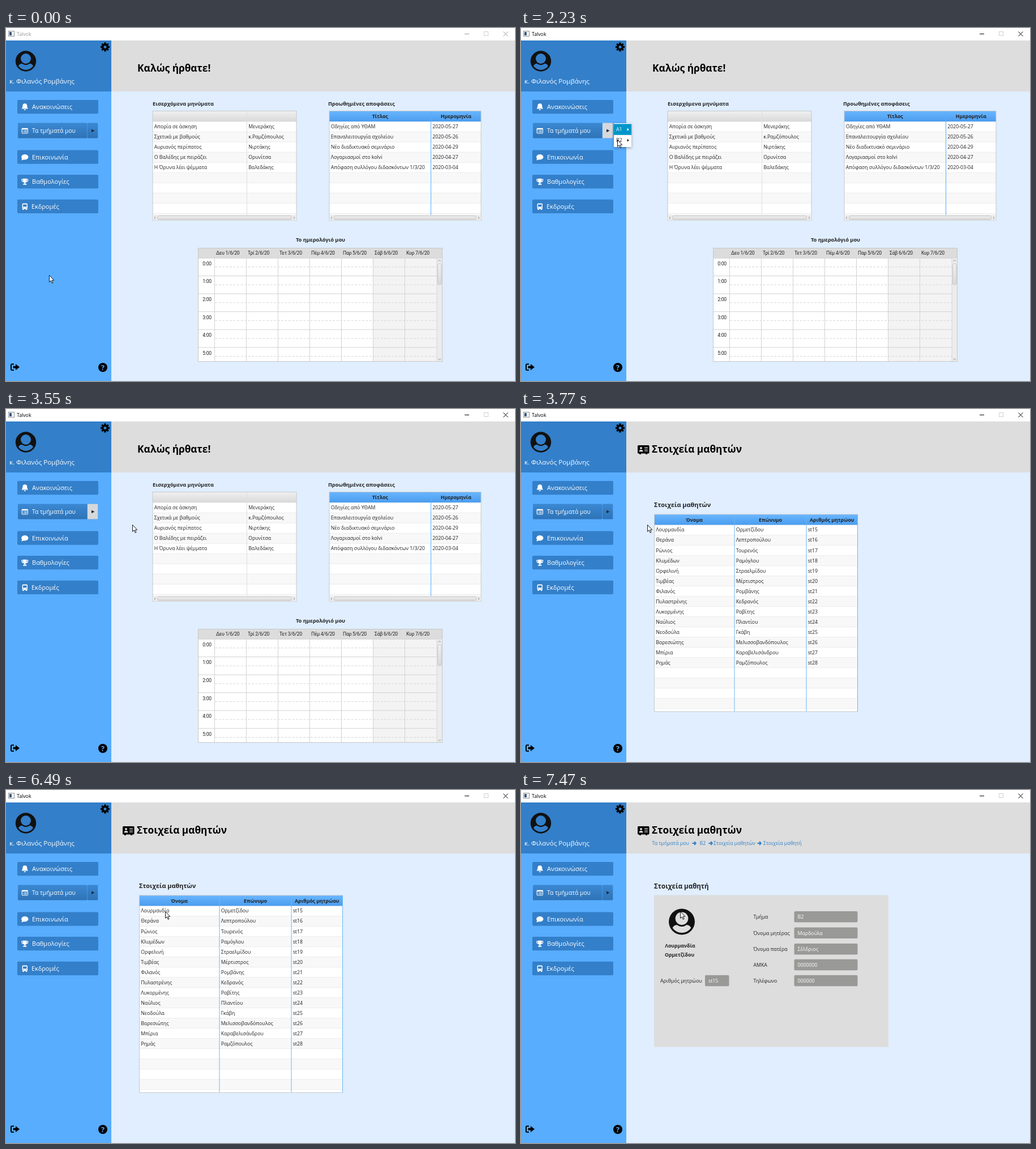
Recreate the animation shown at these times as an HTML page. Size 899 by 623 pixels, loop 8 s.

```html
<!DOCTYPE html>
<html lang="el">
<head>
<meta charset="utf-8">
<title>Talvok</title>
<style>
  html, body { margin: 0; width: 100%; height: 100%; overflow: hidden; background: #e0eeff; }
  svg { display: block; }
  text { font: 8.75px "Open Sans", "Noto Sans", sans-serif; fill: #222; white-space: pre; }
  .b { font-weight: 700; }
  .m { text-anchor: middle; }
  .w { fill: #fff; }
  .btn { font-size: 11px; fill: #fff; }
  .name { font-size: 11.6px; fill: #fff; }
  .title { font-size: 17.3px; fill: #000; }
  .sub { font-size: 9.2px; }
  .h2 { font-size: 10.9px; }
  .h3 { font-size: 11.5px; }
  .crumb { fill: #2f80c8; }
  .cal { font: 8.6px Roboto, "Liberation Sans", sans-serif; letter-spacing: -.25px; }
  .end { text-anchor: end; }
</style>
</head>
<body>
<svg id="stage" width="899" height="623" viewBox="0 0 899 623">
  <defs>
    <linearGradient id="grey" x2="0" y2="1"><stop stop-color="#f0f0f0"/><stop offset="1" stop-color="#d9d9d9"/></linearGradient>
    <linearGradient id="blue" x2="0" y2="1"><stop stop-color="#69b6ff"/><stop offset="1" stop-color="#4b9dee"/></linearGradient>
    <linearGradient id="split" x2="0" y2="1"><stop stop-color="#3b88d2"/><stop offset="1" stop-color="#2e73b7"/></linearGradient>
    <filter id="shadow" x="-20%" y="-20%" width="150%" height="150%">
      <feDropShadow dx="0" dy="1.5" stdDeviation="2.5" flood-opacity=".35"/>
    </filter>
  </defs>
</svg>
<script>
const LOOP = 8000, ACCENT = '#0096c9', SIDE = '#58adff', PANEL = '#ddd', DARK = '#111';

const rect = (x, y, w, h, fill, more = '') =>
  `<rect x="${x}" y="${y}" width="${w}" height="${h}" fill="${fill}" ${more}/>`;
const line = (x1, y1, x2, y2, color, more = '') =>
  `<path d="M${x1} ${y1}L${x2} ${y2}" stroke="${color}" ${more}/>`;
const path = (d, fill, more = '') => `<path d="${d}" fill="${fill}" ${more}/>`;
const disc = (x, y, r, fill) => `<circle cx="${x}" cy="${y}" r="${r}" fill="${fill}"/>`;
const at = (x, y, body, scale = 1) => `<g transform="translate(${x} ${y}) scale(${scale})">${body}</g>`;
const text = (x, y, s, cls = '') => `<text x="${x}" y="${y}" class="${cls}">${s}</text>`;
const group = (id, body) => `<g id="${id}">${body}</g>`;
const range = (n, f) => Array.from({ length: n }, (_, i) => f(i)).join('');

const avatar = (x, y, scale, bg) => at(x, y,
  disc(0, 0, 18.2, DARK) + disc(0, -4.5, 9, bg) +
  path('M-13 8.5C-11.5 5.5-9 4.5-6.8 4.3C-3 7.6 3 7.6 6.8 4.3C9 4.5 11.5 5.5 13 8.5A15.6 15.6 0 0 1-13 8.5Z', bg), scale);

function titleBar(id, ink) {
  return group(id,
    text(19, 13.5, 'Talvok', 'bar').replace('>', ` style="fill:${ink}">`) +
    line(810, 10.5, 818, 10.5, ink) +
    path('M878.5 6.5l8 8m0-8l-8 8', 'none', `stroke="${ink}"`));
}

const icons = {
  bell: path('M0-6C-3-6-4-4-4-1.500C-4 1-5 2-5.800 3.300H5.800C5 2 4 1 4-1.500C4-4 3-6 0-6ZM-1.800 4.200A1.800 1.800 0 0 0 1.800 4.200Z', '#fff'),
  list: rect(-5, -4, 10.5, 8.6, 'none', 'rx="1" stroke="#fff"') + rect(-5, -4.5, 10.5, 2.4, '#fff') +
    path('M-3.500 0h1.300M-1 0h5M-3.500 2.300h1.300M-1 2.300h5', 'none', 'stroke="#fff"'),
  chat: '<ellipse rx="6.200" ry="4.700" fill="#fff"/>' + path('M-5 1.500Q-4.800 4-6.500 5.600Q-3 5.600-1.500 4Z', '#fff'),
  cup: path('M-3.400-5.500H3.400V-2C3.400 0 2 1.500.8 2V3.600H3V5.500H-3V3.600H-.8V2C-2 1.500-3.400 0-3.400-2Z', '#fff') +
    path('M-3.400-4H-5.400C-5.500-1.500-4.500 0-2.500.300M3.400-4H5.400C5.500-1.500 4.500 0 2.500.300', 'none', 'stroke="#fff" stroke-width="1.200"'),
  bus: rect(-4.700, -5.500, 9.400, 10, '#fff', 'rx="1.800"') + rect(-3.300, -3.600, 6.600, 4, '#337fc9') +
    rect(-4, 4, 2.200, 2, '#fff') + rect(1.800, 4, 2.200, 2, '#fff') +
    disc(-2.700, 2.500, .8, '#337fc9') + disc(2.700, 2.500, .8, '#337fc9'),
};
const button = (y, icon, label, x = 46) =>
  rect(20, y, 143, 24.3, '#337fc9', 'rx="2"') + at(33.3, y + 12.2, icons[icon]) + text(x, y + 16, label, 'btn');

function sidebar() {
  const gear = disc(0, 0, 5.800, '#000') +
    range(8, i => rect(-1.700, -8, 3.400, 4, '#000', `transform="rotate(${i * 45})"`)) + disc(0, 0, 2.500, '#337fc9');
  const exit = path('M6 1.200H2.500Q1 1.200 1 2.700V10.300Q1 11.800 2.500 11.800H6', 'none', 'stroke="#000" stroke-width="2"') +
    path('M4.500 4.500H9V1L16 6.500L9 12V8.500H4.500Z', '#000');
  return rect(0, 22, 186, 601, SIDE) + rect(0, 22, 186, 90, '#337fc9') +
    at(175, 33.5, gear) + avatar(35, 58.500, 1, '#337fc9') +
    text(6, 97.800, 'κ. Φιλανός Ρομβάνης', 'name') +
    button(127, 'bell', 'Ανακοινώσεις') +
    rect(21, 167.500, 122.500, 27, 'url(#split)', 'rx="1.500"') +
    group('hover', rect(21, 167.500, 122.500, 27, '#fff', 'opacity=".12"')) +
    at(33, 181.300, icons.list) + text(46, 185, 'Τα τμήματά μου', 'btn').replace('>', ' style="font-size:10.3px">') +
    rect(144, 167.500, 18.300, 27, 'url(#split)', 'rx="1.500"') +
    group('lit', rect(144, 167.500, 18.300, 27, '#d6d8db', 'rx="1.500"')) +
    path('M151 178.500L156.500 181.300L151 184.100Z', '#1c2a38') +
    button(215.500, 'chat', 'Επικοινωνία') + button(259, 'cup', 'Βαθμολογίες') + button(302.800, 'bus', 'Εκδρομές', 45) +
    at(8, 592, exit) + disc(171, 599, 8, '#000') +
    `<text x="171" y="603.500" class="b m" style="font-size:12.5px;fill:${SIDE}">?</text>`;
}

// Striped grid with a header; cols holds the left edge of each column.
function grid({ x, y, w, h, cols, heads, rows, skin, rule }) {
  const n = Math.ceil((h - 18.5) / 18), top = y + 18.5, end = y + h;
  return rect(x, y, w, h, '#fff') +
    range(n, i => rect(x, top + i * 18, w, Math.min(18, end - top - i * 18), i % 2 ? '#f8f8f8' : '#fff') +
      line(x, top + i * 18 + .2, x + w, top + i * 18 + .2, '#ececec')) +
    rect(x, y, w, 18.500, `url(#${skin})`) +
    cols.slice(1).map(c => line(c, y, c, end, rule)).join('') +
    heads.map((s, i) => text((cols[i] + (cols[i + 1] || x + w)) / 2, y + 12.800, s, 'b m')).join('') +
    rows.map((r, j) => r.map((s, i) => text(cols[i] + 2.700, y + 30.400 + j * 18.050, s)).join('')).join('') +
    rect(x, y, w, h, 'none', 'stroke="#c4c8cc"');
}
const hScroll = (x, w) => rect(x + .5, 330, w - 1, 9.500, '#ececec') +
  rect(x + 8.500, 331.500, w - 17, 6.500, 'url(#grey)', 'rx="2.500" stroke="#bdbdbd" stroke-width=".8"') +
  path(`M${x + 5} 333l-2 2l2 2M${x + w - 5} 333l2 2l-2 2`, 'none', 'stroke="#777" stroke-width=".8"');

function calendar() {
  const days = ['Δευ', 'Τρί', 'Τετ', 'Πέμ', 'Παρ', 'Σάβ', 'Κυρ'], step = 31.550;
  return rect(339.500, 388.500, 431, 200, '#fff') + rect(649, 406, 112, 183, '#f3f3f3') +
    rect(339.500, 388.500, 431, 18, '#dcdcdc') +
    range(6, i => {
      const y = 406 + i * step;
      return line(339, y, 761, y, '#d2d2d2') +
        line(369, y + 15.700, 761, y + 15.700, '#d6d6d6', 'stroke-dasharray="4 2.500"') +
        text(362.800, y + 12.900, `${i}:00`, 'cal end');
    }) +
    days.map((d, i) => line(369 + i * 56 - .5, 406, 369 + i * 56 - .5, 589, '#d2d2d2') +
      text(371 + i * 56, 400, `${d} ${i + 1}/6/20`, 'cal')).join('') +
    rect(761, 406, 9.500, 182.500, '#ececec', 'stroke="#d2d2d2" stroke-width=".8"') +
    rect(762.500, 416, 6.500, 37, 'url(#grey)', 'rx="2.500" stroke="#bdbdbd" stroke-width=".8"') +
    path('M763.500 411.500l2.300-2l2.300 2M763.500 583.500l2.300 2l2.300-2', 'none', 'stroke="#777" stroke-width=".8"') +
    rect(339.500, 388.500, 431, 200, 'none', 'stroke="#c8c8c8"');
}

const home = () =>
  text(232, 77, 'Καλώς ήρθατε!', 'b title') +
  text(259, 136.500, 'Εισερχόμενα μηνύματα', 'b sub') +
  grid({ x: 259, y: 146.500, w: 254, h: 193, cols: [259, 425.500], heads: ['', ''], skin: 'grey', rule: '#dedede',
    rows: [['Απορία σε άσκηση', 'Μενεράκης'], ['Σχετικά με βαθμούς', 'κ.Ραμζόπουλος'],
      ['Αυριανός περίπατος', 'Νιρτάκης'], ['Ο Βαλέδης με πειράζει', 'Ορυνίτσα'],
      ['Η Όρυνα λέει ψέμματα', 'Βαλεδάκης']] }) + hScroll(259, 254) +
  text(569, 136.500, 'Προωθημένες αποφάσεις', 'b sub') +
  grid({ x: 571, y: 146.500, w: 268, h: 193, cols: [571, 750.500], heads: ['Τίτλος', 'Ημερομηνία'], skin: 'blue', rule: '#58adff',
    rows: [['Οδηγίες από ΥΘΑΜ', '2020-05-27'], ['Επαναλειτουργία σχολείου', '2020-05-26'],
      ['Νέο διαδικτυακό σεμινάριο', '2020-04-29'], ['Λογαριασμοί στο kolvi', '2020-04-27'],
      ['Απόφαση συλλόγου διδασκόντων 1/3/20', '2020-03-04']] }) + hScroll(571, 268) +
  text(555.500, 376.500, 'Το ημερολόγιό μου', 'b sub m') + calendar();

const pupils = `Λουρμανδία Ορμετζίδου,Θεράνα Λεπτροπούλου,Ρώνιος Τουρενός,Κλυμέδων Ραμόγλου,
Ορφελινή Στραελμίδου,Τιμβέας Μέρτιστρος,Φιλανός Ρομβάνης,Πυλαστρένης Κεδρανός,Λυκορμένης Ραβίτης,
Ναύλιος Πλαντίου,Νεοδούλα Γκάβη,Βαρεσιώτης Μελισσοβανδόπουλος,Μπίρια Καραβελισάνδρου,Ρημάς Ραμζόπουλος`
  .split(',').map((s, i) => [...s.trim().split(' '), `st${15 + i}`]);
const cols = [235.500, 377, 504];

const pupilsTitle = () =>
  rect(206, 64, 20.500, 14.500, '#000', 'rx="1.500"') + disc(212, 69, 2, PANEL) +
  path('M208.500 75.200Q208.500 72 212 72T215.500 75.200Z', PANEL) +
  path('M218 68.200h6M218 71h6M218 73.800h6', 'none', `stroke="${PANEL}" stroke-width="1.200"`) +
  path('M209 78v2h3v-2M220 78v2h3v-2', '#000') +
  text(231, 77, 'Στοιχεία μαθητών', 'b title');

const list = () =>
  text(235, 172.800, 'Στοιχεία μαθητών', 'b h2') +
  grid({ x: 235.500, y: 186, w: 359, h: 348, cols, skin: 'blue', rule: '#6db6f2',
    heads: ['Όνομα', 'Επώνυμο', 'Αριθμός μητρώου'], rows: pupils }) +
  line(594.500, 186, 594.500, 534, '#6db6f2') +
  group('picked', rect(236, 204.500, 358, 17.800, ACCENT) +
    cols.slice(1).map(c => line(c, 204, c, 222, '#6db6f2')).join('') +
    pupils[0].map((s, i) => text(cols[i] + 2.700, 216.400, s, 'w')).join('') +
    rect(235.500, 186, 359.500, 348, 'none', 'stroke="#27a3d8" stroke-width="1.400"'));

const field = (x, y, w, s) => rect(x, y - 9.700, w, 19.400, '#999997', 'rx="2"') + text(x + 6, y + 3.300, s, 'w');
const crumbArrow = x => at(x, 94, path('M-3.500 0H2.500M0-3L3 0L0 3', 'none', 'stroke="#2f80c8" stroke-width="1.800"'));
const detail = () =>
  text(231.500, 97.200, 'Τα τμήματά μου', 'crumb') + crumbArrow(306) + text(315.500, 97.200, 'B2', 'crumb') + crumbArrow(335) +
  text(340, 97.200, 'Στοιχεία μαθητών', 'crumb') + crumbArrow(421) + text(428, 97.200, 'Στοιχεία μαθητή', 'crumb') +
  text(235, 174, 'Στοιχεία μαθητή', 'b h3') + rect(235, 185.500, 414, 268, PANEL) +
  avatar(284, 232.500, 1.260, PANEL) +
  text(281, 278, pupils[0][0], 'b m') + text(280, 294, pupils[0][1], 'b m') +
  text(246, 340, 'Αριθμός μητρώου') + field(325, 336.500, 42.500, 'st15') +
  [['Τμήμα', 'B2', 223.700], ['Όνομα μητέρας', 'Μαρδούλα', 252.300], ['Όνομα πατέρα', 'Σέλδριος', 280.800],
    ['ΑΜΚΑ', '0000000', 308.500], ['Τηλέφωνο', '000000', 336.500]]
    .map(([k, v, y]) => text(410.500, y + 3.300, k) + field(482.500, y, 112, v)).join('');

const popup = (x, y, w, h) => rect(x, y, w, h, '#fff', 'filter="url(#shadow)"');
const tri = (y, fill) => path(`M187.500 ${y - 2.500}L191 ${y}L187.500 ${y + 2.500}Z`, fill);
const pick = (id, y, s) => group(id, rect(164, y, 31, 19.500, ACCENT) + text(168, y + 13, s, 'w') + tri(y + 10, '#fff'));
const menu = () => popup(164, 168, 31, 42) +
  text(168, 182.300, 'A1') + tri(179.300, '#222') + text(168, 201.300, 'B2') + tri(198.300, '#222') +
  pick('pickA', 169.300, 'A1') + pick('pickB', 188.500, 'B2');
const submenu = () => popup(195, 188, 101, 120) + rect(195, 189, 101, 19.500, ACCENT) +
  ['Στοιχεία μαθητών', 'Βαθμολογίες', 'Απουσίες', 'Πρόγραμμα', 'Εργασίες', 'Ανακοινώσεις']
    .map((s, i) => text(201, 202 + i * 19.700, s, i ? '' : 'w')).join('');

document.getElementById('stage').innerHTML +=
  rect(0, 0, 899, 22, '#fff') + rect(4.500, 5.500, 10, 9, '#fff', 'stroke="#8a8f96"') + rect(6, 7, 4, 6, '#39587c') +
  rect(844.500, 6.500, 7, 7, 'none', 'stroke="#d0d0d0"') +
  titleBar('idle', '#999') + titleBar('active', '#000') +
  rect(186, 22, 713, 601, '#e0eeff') + rect(186, 22, 713, 90, PANEL) + sidebar() +
  group('home', home()) + group('head', pupilsTitle()) + group('list', list()) + group('detail', detail()) +
  group('menu', menu()) + group('submenu', submenu()) +
  group('click', disc(0, 0, 9, 'rgba(255,255,0,.47)')) +
  group('cursor', path('M.5.500V12.300L3.200 9.800L5.200 14.400L7 13.600L5.100 9.200H8.700Z', '#fff', 'stroke="#000" stroke-width=".9"'));

// Visible spans: [id, from, to, from, to, ...]
const spans = [
  ['idle', 0, 1680], ['active', 1680, LOOP], ['hover', 590, 690], ['lit', 1150, 3770],
  ['home', 0, 3770], ['head', 3770, LOOP], ['list', 3770, 7470], ['picked', 7150, 7470], ['detail', 7470, LOOP],
  ['menu', 1810, 3550], ['pickA', 2020, 2350], ['pickB', 2350, 3550], ['submenu', 2350, 3550],
  ['click', 1680, 1810, 3330, 3550, 7150, 7260],
];
// Pointer tip: [time, x, y]
const tips = [
  [0, 76, 436], [100, 58, 390], [200, 30, 330], [290, 7, 262], [380, -50, 262],
  [590, 120, 180], [690, 195, 186], [940, 184, 188], [1050, 167, 190], [1150, 153, 190],
  [2020, 158, 192], [2130, 165, 195], [2230, 170, 197], [2350, 174, 200],
  [2560, 184, 202], [2670, 197, 204], [2780, 211, 204], [2890, 223, 204],
  [4410, 227, 206], [4520, 238, 211], [4630, 251, 215], [4740, 263, 217],
  [4850, 272, 216], [4960, 277, 214], [5070, 280, 212], [5180, 281, 211],
  [6380, 281, 212], [6490, 281, 214],
];

const el = id => document.getElementById(id);
const parts = spans.map(([id, ...s]) => [el(id), s]);
const pointer = el('cursor'), ring = el('click');
const start = performance.now();

function draw() {
  const t = Math.max(0, performance.now() - start) % LOOP;
  for (const [node, s] of parts) {
    const on = s.some((from, i) => i % 2 === 0 && t >= from && t < s[i + 1]);
    node.style.display = on ? '' : 'none';
  }
  const [, x, y] = tips.findLast(p => p[0] <= t);
  for (const node of [pointer, ring]) node.setAttribute('transform', `translate(${x} ${y})`);
  requestAnimationFrame(draw);
}
draw();
</script>
</body>
</html>
```
